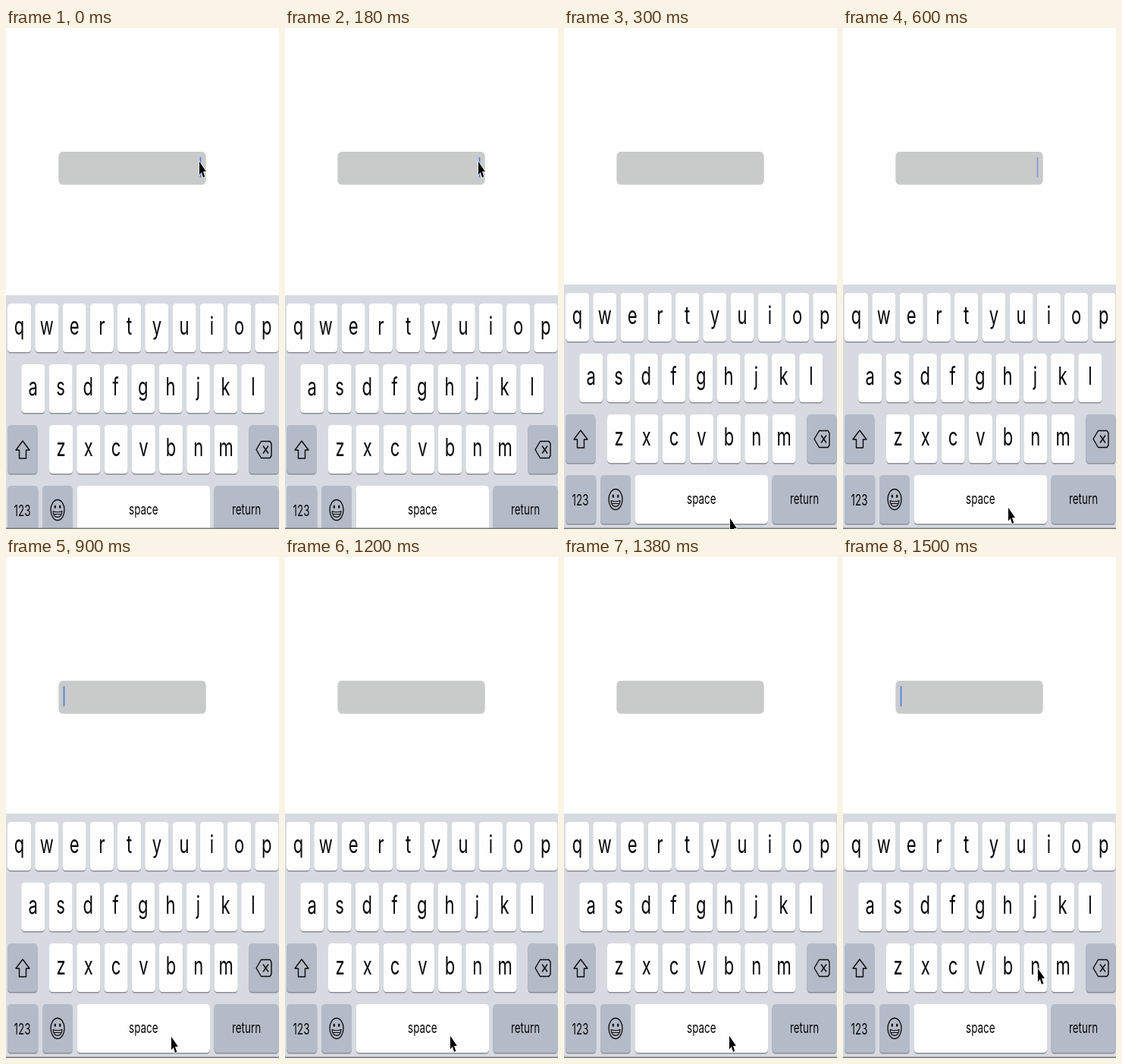
These frames come from a looping animation (360 px wide and 660 px high, 1.8 s). An HTML page with a canvas:

```html
<!DOCTYPE html>
<html lang="en">
<head>
<meta charset="utf-8">
<title>Keyboard and text field</title>
<style>
html, body { margin: 0; width: 100%; height: 100%; overflow: hidden; background: #fff; }
canvas { display: block; width: 360px; height: 660px; }
</style>
</head>
<body>
<canvas id="stage" width="360" height="660"></canvas>
<script>
const ctx = document.getElementById('stage').getContext('2d');
const STEP = 300;
const TALL = 1.48; // the whole scene is taller than it is wide
const INK = '#090909', KEY = '#fefefe', DARK_KEY = '#b4bbc8';
const BLUE = '#4276f2', PALE_BLUE = '#7f97dc';

// keyboard top, text caret, pointer tip
const steps = [
  { top: 352, caret: [256.5, BLUE], tip: [255, 176] },
  { top: 338, tip: [219, 646] },
  { top: 338, caret: [256.5, PALE_BLUE], tip: [218, 632] },
  { top: 338, caret: [76.5, BLUE], tip: [218, 632] },
  { top: 338, tip: [218, 631] },
  { top: 338, caret: [76.5, BLUE], tip: [257, 542] }
];

function box(x, y, w, h, color, rx = 4, ry = 5.5) {
  ctx.fillStyle = color;
  ctx.beginPath();
  ctx.roundRect(x, y, w, h, { x: rx, y: ry });
  ctx.fill();
}

function poly(points, close = true) {
  ctx.beginPath();
  points.forEach(([x, y]) => ctx.lineTo(x, y));
  if (close) ctx.closePath();
}

function label(text, x, y, size) {
  ctx.save();
  ctx.translate(x, y);
  ctx.scale(1, TALL);
  ctx.font = `400 ${size}px Inter, "Liberation Sans", sans-serif`;
  ctx.textAlign = 'center';
  ctx.fillStyle = INK;
  ctx.fillText(text, 0, 0);
  ctx.restore();
}

function key(x, y, w, color = KEY) {
  box(x, y + 1.5, w, 64, '#8b8e94');
  box(x, y, w, 64, color);
}

function letters(text, x, y) {
  [...text].forEach((c, i) => {
    const left = x + i * 36.25;
    key(left, y, 31.2);
    label(c, left + 15.6, y + 41, 22);
  });
}

function outline(width = 1.4) {
  ctx.strokeStyle = INK;
  ctx.lineWidth = width;
  ctx.lineJoin = 'round';
  ctx.stroke();
}

function shiftIcon(x, y) {
  poly([[x, y - 12], [x + 9, y], [x + 4.5, y], [x + 4.5, y + 11],
        [x - 4.5, y + 11], [x - 4.5, y], [x - 9, y]]);
  outline();
}

function deleteIcon(x, y) {
  poly([[x - 10, y], [x - 3.5, y - 11], [x + 8, y - 11], [x + 10, y - 8],
        [x + 10, y + 8], [x + 8, y + 11], [x - 3.5, y + 11]]);
  outline();
  for (const s of [-1, 1]) {
    poly([[x - 1, y - 5 * s], [x + 6, y + 5 * s]], false);
    outline();
  }
}

function smiley(x, y) {
  ctx.beginPath();
  ctx.ellipse(x, y, 9, 13.5, 0, 0, Math.PI * 2);
  outline(1.3);
  ctx.fillStyle = INK;
  for (const dx of [-3.2, 3.2]) {
    ctx.beginPath();
    ctx.ellipse(x + dx, y - 4.2, 1.2, 2.3, 0, 0, Math.PI * 2);
    ctx.fill();
  }
  ctx.beginPath();
  ctx.moveTo(x - 6, y + 1.5);
  ctx.quadraticCurveTo(x, y + 4, x + 6, y + 1.5);
  ctx.bezierCurveTo(x + 5, y + 12, x - 5, y + 12, x - 6, y + 1.5);
  outline(1.2);
  poly([[x - 5, y + 5.5], [x + 5, y + 5.5]], false);
  outline(1);
}

function keyboard(top) {
  ctx.fillStyle = '#d7dbe1';
  ctx.fillRect(0, top, 360, 660 - top);
  const [a, b, c, d] = [0, 1, 2, 3].map(i => top + 11 + i * 80);
  letters('qwertyuiop', 2, a);
  letters('asdfghjkl', 20.2, b);
  letters('zxcvbnm', 57, c);
  key(2, c, 39.5, DARK_KEY);
  shiftIcon(22, c + 33);
  key(320.3, c, 39.5, DARK_KEY);
  deleteIcon(340, c + 32.5);
  key(2, d, 40.3, DARK_KEY);
  label('123', 21.5, d + 39.5, 13.4);
  key(48, d, 40, DARK_KEY);
  smiley(68, d + 32);
  key(93.5, d, 175.5);
  label('space', 181.3, d + 37.5, 13.4);
  key(274.5, d, 85, DARK_KEY);
  label('return', 317, d + 37.5, 13.4);
  ctx.fillStyle = '#77797e';
  ctx.fillRect(0, 658.5, 360, 1.5);
}

function pointer(x, y) {
  ctx.save();
  ctx.translate(x, y);
  poly([[0, 0], [0, 17.5], [2.8, 14], [5, 21], [7.2, 19.7], [5, 13], [8.8, 13]]);
  ctx.strokeStyle = '#f4f4f4';
  ctx.lineWidth = 1.6;
  ctx.stroke();
  ctx.fillStyle = '#000';
  ctx.fill();
  ctx.restore();
}

function draw(time) {
  const { top, caret, tip } = steps[Math.floor(time / STEP) % steps.length];
  ctx.fillStyle = '#fff';
  ctx.fillRect(0, 0, 360, 660);
  box(69.3, 163, 194.5, 43.5, '#c9cbca', 5, 7);
  if (caret) box(caret[0] - 0.8, 170, 1.6, 27, caret[1], 0.8, 1);
  keyboard(top);
  pointer(...tip);
}

const start = performance.now();
function tick() {
  draw(performance.now() - start);
  requestAnimationFrame(tick);
}
tick();
</script>
</body>
</html>
```
